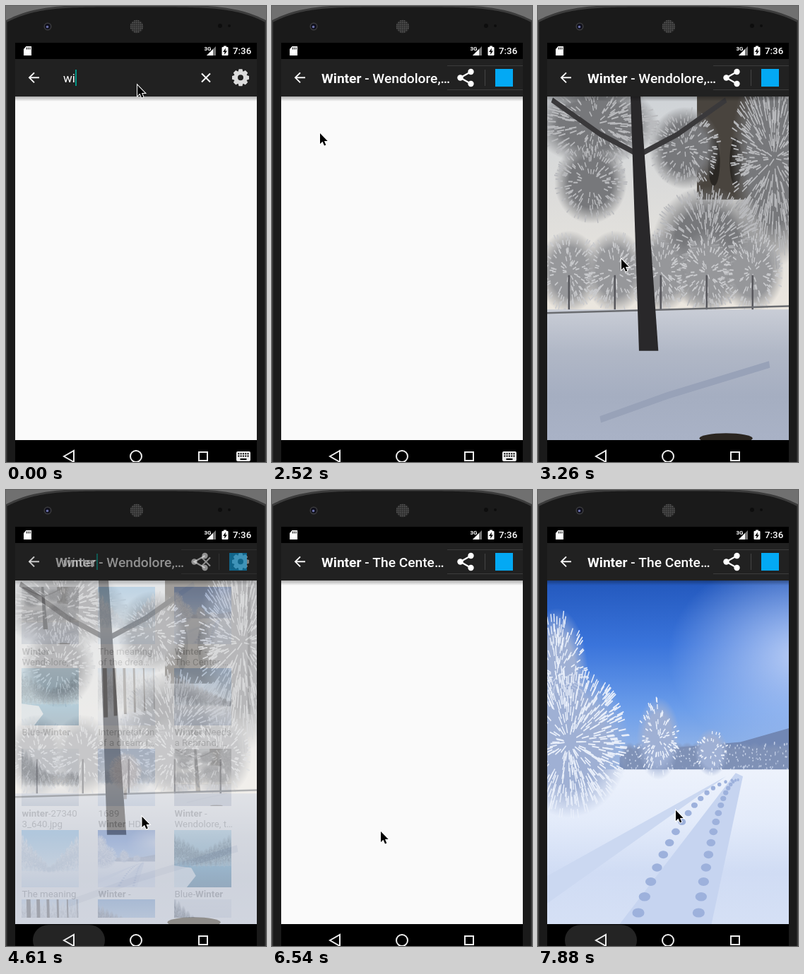
An HTML page with a canvas for the animation above (8 s loop, 368 by 645 pixels).

```html
<!DOCTYPE html>
<html lang="en">
<head>
<meta charset="utf-8">
<title>Image search</title>
<style>
  html, body { margin: 0; width: 100%; height: 100%; overflow: hidden; background: #777; }
  canvas { display: block; }
</style>
</head>
<body>
<canvas id="stage" width="368" height="645"></canvas>
<script>
const LOOP = 8000, STEP = 148.6;
const stage = document.getElementById('stage').getContext('2d');
let g = stage, seed = 1;

// --- drawing helpers ---
const rnd = () => (seed = seed * 16807 % 2147483647) / 2147483647;

function rect(color, x, y, w, h, r = 0) {
  g.fillStyle = color;
  g.beginPath();
  g.roundRect(x, y, w, h, r);
  g.fill();
}
function trace(pts) {
  g.beginPath();
  for (let i = 0; i < pts.length; i += 2) g.lineTo(pts[i], pts[i + 1]);
}
function poly(color, ...pts) {
  g.fillStyle = color;
  trace(pts);
  g.fill();
}
function line(color, width, ...pts) {
  g.strokeStyle = color;
  g.lineWidth = width;
  trace(pts);
  g.stroke();
}
function oval(color, x, y, rx, ry = rx) {
  g.fillStyle = color;
  g.beginPath();
  g.ellipse(x, y, rx, ry, 0, 0, 7);
  g.fill();
}
function fade(x, y, w, h, ...colors) {
  const fill = g.createLinearGradient(0, y, 0, y + h);
  colors.forEach((c, i) => fill.addColorStop(i / (colors.length - 1), c));
  rect(fill, x, y, w, h);
}
// Text in which *stars* switch to bold; returns the end of the text.
function rich(str, x, y, size, color, weight = 400) {
  g.fillStyle = color;
  str.split('*').forEach((part, i) => {
    g.font = `${i % 2 ? 700 : weight} ${size}px Roboto, sans-serif`;
    g.fillText(part, x, y);
    x += g.measureText(part).width;
  });
  return x;
}

// --- pictures, painted in a 100 x 100 space ---
const band = (top, bottom, ...colors) => fade(0, top, 100, bottom - top, ...colors);

function glow(x, y, rx, ry, color, core = 0) {
  g.save();
  g.translate(x, y);
  g.scale(rx, ry);
  const fill = g.createRadialGradient(0, 0, core, 0, 0, 1);
  fill.addColorStop(0, color);
  fill.addColorStop(1, color + '00');
  oval(fill, 0, 0, 1);
  g.restore();
}
// A soft tree crown with light twigs pointing outwards.
function crown(x, y, rx, ry, dark, light) {
  glow(x, y, rx, ry, dark, .6);
  for (let i = rx * ry; i > 0; i--) {
    const a = rnd() * 6.28, r = Math.sqrt(rnd()) * .9, s = r + .12;
    const dx = Math.cos(a) * rx, dy = Math.sin(a) * ry;
    line(light, .4, x + dx * r, y + dy * r, x + dx * s, y + dy * s);
  }
}
// Sky, ground, and trees whose height follows a profile.
function scene(sky, ground, horizon, [dark, light], profile, finish) {
  return () => {
    band(0, horizon, ...sky);
    band(horizon, 100, ...ground);
    for (let x = 0; x <= 100; x += 8) {
      const h = profile(x);
      crown(x, horizon + 3 - h / 2, 6, h / 2, dark, light);
    }
    finish?.();
  };
}

function park() {
  const frost = ['#77787b', '#b9babd'];
  band(0, 63, '#cfd3d7', '#ece7df');
  rect('#49443e', 62, 0, 26, 30);
  for (const x of [69, 78]) oval('#2a2723', x, 19, 2.5, 7);
  crown(94, 18, 18, 32, ...frost);
  crown(66, 44, 23, 18, ...frost);
  for (let x = 9; x < 100; x += 19) {
    crown(x, 51, 13, 12, '#96979a', '#c9cacd');
    line('#55555a', .7, x, 52, x, 63);
  }
  band(62, 100, '#c9cdd6', '#b0b7c6', '#a5aec1', '#a9b2c6');
  line('#6a6c70', .5, 0, 63, 100, 61);
  line('#98a2b8', 2, 22, 94, 50, 87, 92, 78);
  for (const [x, y, r] of [[20, 8, 26], [18, 25, 15], [57, 15, 15]]) crown(x, y, r, 12, ...frost);
  for (const side of [-1, 1]) line('#3a393b', 1.6, 38, 17, 38 + side * 16, 11, 38 + side * 36, 1);
  poly('#29282a', 34.5, 0, 38.6, 0, 46, 74, 38, 74);
  oval('#2a2520', 74, 99.5, 11, 1.5);
}
function snowPath() {
  const frost = ['#9fb0d4', '#e9effa'];
  band(0, 56, '#2358bd', '#3a74db', '#6b9dea', '#a5bfe6');
  glow(105, 22, 55, 30, '#b9cdf5');
  poly('#7187b4', 30, 50, 80, 47, 100, 43, 100, 58, 30, 58);
  for (let x = 34; x < 102; x += 4) crown(x, 52, 4, 5, '#7f91b6', '#c3cfe6');
  band(55, 100, '#edf2fc', '#e3ebfa', '#d0dcf4', '#d5e0f5');
  poly('#cbd8f1', 0, 86, 74, 57, 0, 94);
  poly('#c6d4f0', 78, 56, 81, 57, 68, 100, 30, 100);
  for (let f = 0; f < 1; f += .06)
    for (const end of [36, 62]) oval('#9db1dc', 79 + (end - 79) * f, 58 + 42 * f * f, .4 + 2.2 * f, .4 + f);
  crown(46, 46, 9, 12, ...frost);
  crown(68, 50, 7, 7, ...frost);
  crown(4, 28, 13, 20, ...frost);
  crown(9, 47, 25, 22, ...frost);
}
const fromMiddle = x => Math.abs(x - 50);
const avenue = scene(['#5fb0ec', '#d8ecfa'], ['#e8f1fa', '#c8dcf2'], 72,
  ['#a9c1da', '#eef4fa'], x => 10 + 1.2 * fromMiddle(x));
const lake = scene(['#8cc4e0', '#3d8ab0'], ['#1d7fb5', '#0e4f7c'], 62,
  ['#0f3d58', '#6fa9c6'], x => 30 + .6 * fromMiddle(x),
  () => poly('#cfe4f1', 0, 62, 30, 66, 38, 80, 22, 100, 0, 100));
const trunks = scene(['#bcd6f0', '#eef1f4'], ['#e6ebf4', '#cfd9ea'], 75,
  ['#a7acb6', '#e6ebf2'], () => 75,
  () => { for (let x = 12; x < 100; x += 17) line('#39322f', 8 - x / 14, x, 0, x + 2, 88 - x / 6); });
const bench = scene(['#5d93d2', '#cfe0ef'], ['#dbe2ee', '#8c9fc0'], 65,
  ['#4a5568', '#93a4bb'], x => 60 - .5 * x);
const forest = scene(['#dfe4ec', '#c6cedb'], ['#e4e9f1', '#a9b5c8'], 64,
  ['#3a434f', '#98a4b4'], x => 28 + Math.max(0, 44 - x));
const roundTree = scene(['#6f94cc', '#a9c0e0'], ['#dbe5f4', '#b4c6e2'], 60,
  ['#6a85ac', '#a9bcd6'], () => 28, () => {
    line('#4a4344', 5, 48, 60, 48, 88);
    crown(48, 40, 29, 33, '#b5aab2', '#e6dfe1');
  });

function photo(paint, w, h) {
  const c = document.createElement('canvas');
  c.width = w;
  c.height = h;
  g = c.getContext('2d');
  g.scale(w / 100, h / 100);
  seed = 77;
  paint();
  g = stage;
  return c;
}

// Results repeat in this order.
const RESULTS = [
  [park, '*Winter* -|Wendolore, t…'], [avenue, 'The meaning|of the drea…'],
  [snowPath, '*Winter* -|The Center …'], [lake, 'Blue-*Winter*'],
  [trunks, 'Interpretation|of a dream i…'], [bench, '*Winter* Needs|a Rebrand, …'],
  [forest, '*winter*-27340|3_640.jpg'], [roundTree, '1689|*Winter* HD …'],
].map(([paint, caption]) => ({ thumb: photo(paint, 81, 81), lines: caption.split('|') }));

const PAGES = [
  { title: '*Winter* - Wendolore,…', photo: photo(park, 342, 486), opened: 16, loaded: 22, closed: 31 },
  { title: '*Winter* - The Cente…', photo: photo(snowPath, 342, 486), opened: 38, loaded: 45, closed: 99 },
];

// --- phone and system bars ---
function phone() {
  rect('#707070', 0, 0, 368, 645);
  g.beginPath();
  g.moveTo(0, 645);
  for (let x = 0; x <= 368; x += 4) g.lineTo(x, 22 * Math.abs(x / 184 - 1) ** 4.5);
  g.lineTo(368, 645);
  g.fillStyle = '#1a1a1a';
  g.fill();
  g.strokeStyle = '#3c3c3c';
  g.lineWidth = 3;
  g.stroke();
  oval('#3b3b3d', 59, 29, 5.5);
  oval('#10101c', 59, 29, 4);
  oval('#6a6fa8', 58.5, 29.5, 1.8);
  oval('#2b2b2b', 185, 29, 9.5);
  for (let y = -8; y <= 8; y += 2.6)
    for (let x = -8; x <= 8; x += 2.6)
      if (Math.hypot(x, y) < 8.6) oval('#686868', 185 + x, 29 + y, .8);
  oval('#0d0d0d', 303, 28, 3);
  oval('#0d0d0d', 316, 28, 2);
}
function statusBar() {
  rect('#000', 13, 52, 342, 23);
  poly('#fff', 28.5, 57, 36, 57, 36, 70, 25, 70, 25, 61);
  for (let x = 29; x < 35; x += 2.3) rect('#000', x, 58.5, 1, 3);
  rich('*3G*', 280.5, 62.5, 8, '#fff');
  poly('#777', 284, 70, 297, 57, 297, 70);
  poly('#fff', 284, 70, 293, 61, 293, 70);
  rect('#fff', 308, 56.5, 4, 2);
  rect('#fff', 305.5, 58, 9, 12, 1);
  poly('#000', 311, 59.5, 307, 65, 309.5, 65, 309, 69, 313, 63.5, 310.5, 63.5);
  rich('7:36', 321, 68.3, 13.3, '#fff', 500);
}
function navBar(sinceTap, keyboard) {
  rect('#000', 13, 614, 342, 31);
  if (sinceTap >= 0 && sinceTap < 4) {
    const size = Math.min(1, .6 + .4 * sinceTap);
    g.globalAlpha = Math.min(1, (4 - sinceTap) / 3);
    rect('#242424', 89 - 51 * size, 637 - 22 * size, 102 * size, 44 * size, 22 * size);
    g.globalAlpha = 1;
  }
  line('#eee', 2, 96, 629, 82, 637, 96, 645, 96, 629, 82, 637);
  g.beginPath();
  g.arc(184, 637, 8, 0, 7);
  g.rect(273, 631, 12, 12);
  g.stroke();
  if (!keyboard) return;
  rect('#eee', 326, 630, 20, 14, 2);
  for (let i = 0; i < 10; i++) rect('#000', 328.3 + i % 5 * 3.3, i < 5 ? 632.3 : 635.6, 2, 2);
  rect('#000', 331.5, 640, 9, 2);
}

// --- app screens ---
function toolbar() {
  fade(13, 128, 342, 7, 'rgba(0,0,0,.3)', 'rgba(0,0,0,0)');
  rect('#212121', 13, 75, 342, 53);
  line('#fff', 1.9, 47, 101.3, 33, 101.3);
  line('#fff', 1.9, 40, 94.3, 33, 101.3, 40, 108.3);
}
function gear(x, y) {
  for (let i = 0; i < 8; i++) {
    g.save();
    g.translate(x, y);
    g.rotate(i * Math.PI / 4);
    poly('#dcdcdc', -3.6, -8, -2.4, -12, 2.4, -12, 3.6, -8);
    g.restore();
  }
  oval('#dcdcdc', x, y, 9.3);
  oval('#212121', x, y, 4);
}
function resultGrid() {
  g.save();
  g.beginPath();
  g.rect(13, 128, 342, 477);
  g.clip();
  for (let row = 0, y = 137.3; row < 5; row++) {
    const shownLines = row < 3 ? 2 : 1;
    for (let col = 0; col < 3; col++) {
      const { thumb, lines } = RESULTS[(row * 3 + col) % 8], x = 22 + col * 108;
      g.drawImage(thumb, x, Math.round(y));
      lines.slice(0, shownLines).forEach((s, n) => rich(s, x + .5, y + 95.5 + n * 15, 13.3, '#757575'));
    }
    y += 83.4 + 15.5 * shownLines;
  }
  g.restore();
}
function searchScreen(k) {
  rect('#fafafa', 13, 128, 342, 486);
  if (k >= 8) resultGrid();
  if (k >= 31 && k < 36) rect(k < 35 ? '#b0b0b0' : '#d5d5d5', 342, 137, 4, 180);
  toolbar();
  const end = rich('winter'.slice(0, 2 + Math.round(k * 4 / 3)), 81, 108, 17.1, '#fff');
  const caretOff = (k >= 7 && k <= 10) || (k >= 14 && k < 31) || k >= 36;
  if (!caretOff) rect('#009688', Math.round(end), 90, 2, 23);
  for (const s of [-6, 6]) line('#fff', 2, 283 - s, 95.5, 283 + s, 107.5);
  gear(332, 101.3);
}
function pageScreen(k, page) {
  rect('#fafafa', 13, 128, 342, 486);
  if (k >= page.loaded) g.drawImage(page.photo, 13, 128);
  toolbar();
  rich(page.title, 70, 108.5, 19.2, '#fff', 500);
  for (const y of [84.5, 118.5]) line('#3c3c3c', 1, 248, y, 355, y);
  line('#444', 1, 301.5, 90, 301.5, 113);
  line('#fff', 2.2, 281.5, 93, 266.5, 101.5, 281.5, 110);
  oval('#fff', 266.5, 101.5, 4.2);
  for (const y of [93, 110]) oval('#fff', 281.5, y, 4.2);
  rect('#03a9f4', 316, 89, 25, 25);
}

// --- pointer moves: leave, arrive, x, y ---
const MOVES = [
  [8, 11, 163, 152], [11, 14, 68, 180], [20, 22, 118, 358], [22, 28, 62, 630], [30, 33, 323, 294],
  [33, 36, 285, 185], [40, 44, 154, 483], [44, 50, 84, 630], [52, 53, 195, 453],
];
function pointer(k) {
  let x = 186, y = 112;
  for (const [leave, arrive, toX, toY] of MOVES) {
    const f = Math.min(1, Math.max(0, (k - leave) / (arrive - leave)));
    const eased = Math.sin(f * Math.PI / 2);
    x += (toX - x) * eased;
    y += (toY - y) * eased;
  }
  g.save();
  g.translate(x, y);
  trace([0, 0, 0, 15, 3.5, 11.8, 6, 17.5, 8.3, 16.5, 6, 11, 10.7, 11]);
  g.closePath();
  g.strokeStyle = '#fff';
  g.lineWidth = 2;
  g.stroke();
  g.fillStyle = '#000';
  g.fill();
  g.restore();
}

function draw() {
  const t = performance.now() % LOOP;
  const k = Math.min(53, Math.floor((t + 10) / STEP));
  const page = PAGES.find(p => k >= p.opened && k <= p.closed);
  const turning = page && (k === page.opened || k === page.closed);

  phone();
  g.save();
  g.beginPath();
  g.rect(13, 75, 342, 539);
  g.clip();
  if (!page || turning) searchScreen(k);
  if (page) {
    g.globalAlpha = turning ? .5 : 1;
    pageScreen(k, page);
  }
  g.restore();
  statusBar();
  navBar(k < 52 ? k - 30 : k - 52, !page || k < page.opened + 2);
  pointer(k);
  requestAnimationFrame(draw);
}
draw();
</script>
</body>
</html>
```
